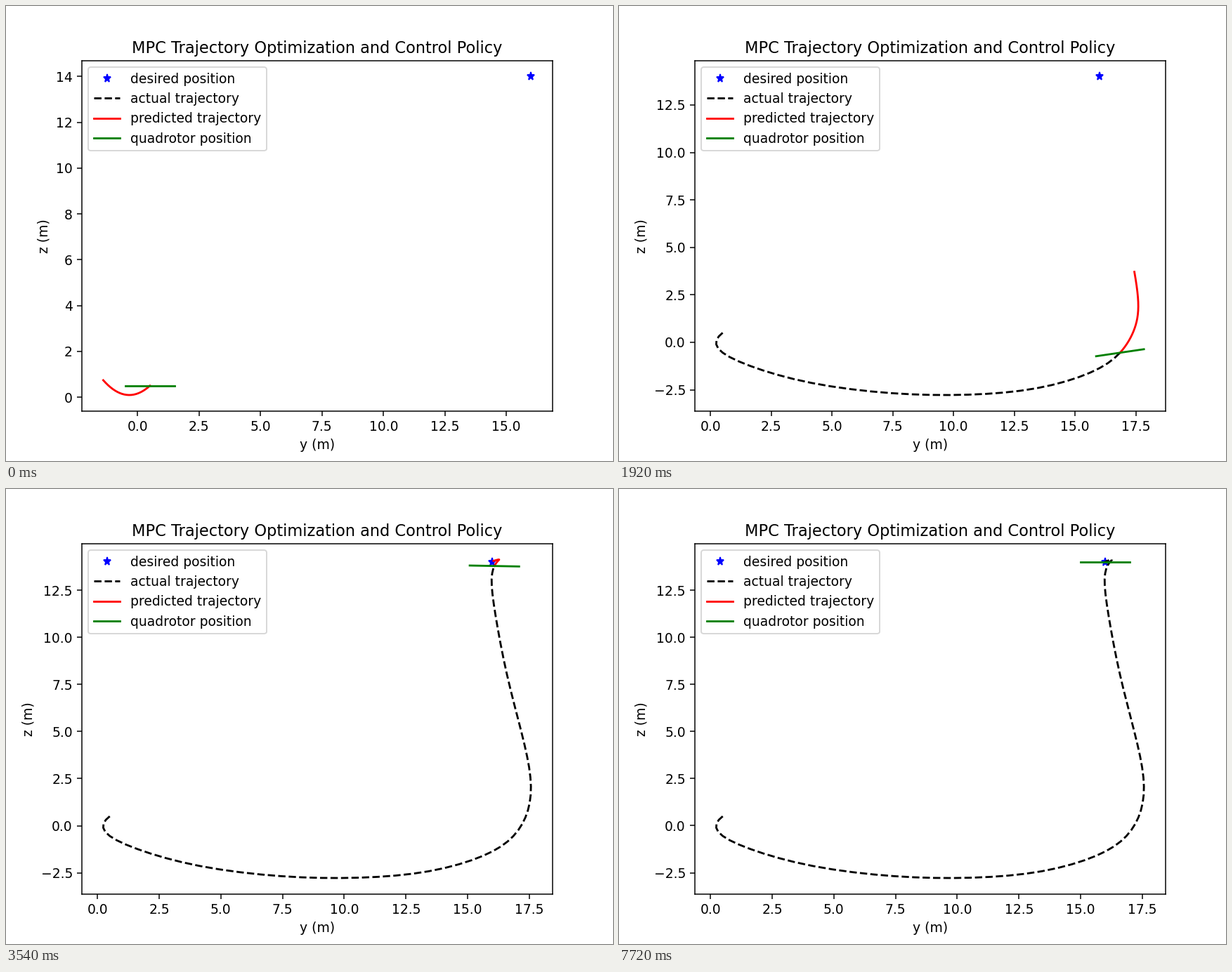
A matplotlib script for the animation above (8 s loop, 864 by 648 pixels).

```python
import numpy as np
import matplotlib.pyplot as plt
from matplotlib.animation import FuncAnimation

LOOP_MS, TICK_MS, STEP_MS = 8000, 40, 60
STEPS = LOOP_MS // STEP_MS + 1
HORIZON = 10
GOAL = np.array([16, 14])
START_VELOCITY = np.array([-.19, -.184])

# Waypoints (y, z) at even intervals; the quadrotor hovers after the last one.
INTERVAL = 4
WAYPOINTS = np.array([
    (.5, .5), (.32, -.33), (1.62, -1.24), (4.15, -2.14), (7.45, -2.68),
    (10.6, -2.76), (13.42, -2.42), (15.62, -1.6), (16.85, -.55), (17.44, .82),
    (17.54, 2.57), (17.18, 4.95), (16.59, 8.03), (16.13, 11.15), (15.97, 13.1),
    (16.14, 13.92), (16.27, 14.13), (16.08, 14.06), (15.98, 14), GOAL, GOAL])


def spline_slopes(points, first):
    """Slopes of the C2 cubic spline that starts with a given slope and ends at rest."""
    n = len(points)
    system = 4 * np.eye(n) + np.eye(n, k=1) + np.eye(n, k=-1)
    system[[0, -1]] = np.eye(n)[[0, -1]]
    rhs = np.zeros_like(points)
    rhs[0] = first
    rhs[1:-1] = 3 * (points[2:] - points[:-2])
    return np.linalg.solve(system, rhs)


SLOPES = spline_slopes(WAYPOINTS, START_VELOCITY * INTERVAL)


def position(step):
    x = np.clip(np.asarray(step) / INTERVAL, 0, len(WAYPOINTS) - 1)
    i = np.minimum(x.astype(int), len(WAYPOINTS) - 2)
    u = (x - i)[..., None]
    ease = u * u * (3 - 2 * u)
    return (WAYPOINTS[i] * (1 - ease) + WAYPOINTS[i + 1] * ease
            + SLOPES[i] * u * (1 - u)**2 - SLOPES[i + 1] * u * u * (1 - u))


steps = np.arange(STEPS)
track = position(steps)
velocity = np.gradient(track, axis=0)
# Sideways acceleration comes from tilting; the quadrotor starts level.
roll = -5 * np.gradient(velocity[:, 0]) * (1 - np.exp(-steps))

s = np.linspace(0, 1, 21)
col = s[:, None]
first_plan = (track[0] + HORIZON * START_VELOCITY * col
              + np.array([0, 2.08]) * col**2)


def plan(step):
    """The coming path, swinging wide of the goal and overshooting with speed."""
    ahead = position(step + HORIZON * s)
    swing = .2 * col**3 * (col - 1) * (GOAL - ahead[-1])
    overshoot = .15 * col**3 * velocity[step]
    doubt = np.exp(-1.5 * step)
    return (1 - doubt) * (ahead + swing + overshoot) + doubt * first_plan


fig, ax = plt.subplots(figsize=(6.4, 4.8), dpi=135)
ax.plot(*GOAL, "b*", label="desired position")
actual, = ax.plot([], [], "k--", label="actual trajectory")
predicted, = ax.plot([], [], "r", label="predicted trajectory")
quadrotor, = ax.plot([], [], "g", label="quadrotor position")
ax.set(title="MPC Trajectory Optimization and Control Policy", xlabel="y (m)", ylabel="z (m)")
ax.legend(loc="upper left")


def update(tick):
    # Sampling mid-tick keeps the 60 ms steps aligned with the 40 ms ticks.
    step = int((tick + .5) * TICK_MS // STEP_MS)
    arm = np.array([np.cos(roll[step]), np.sin(roll[step])])
    actual.set_data(*track[:step + 1].T)
    predicted.set_data(*plan(step).T)
    quadrotor.set_data(*np.array([track[step] - arm, track[step] + arm]).T)
    ax.relim()
    ax.autoscale_view()
    return actual, predicted, quadrotor


anim = FuncAnimation(fig, update, frames=LOOP_MS // TICK_MS, interval=TICK_MS,
                     repeat=True, repeat_delay=0)
plt.show()
```
